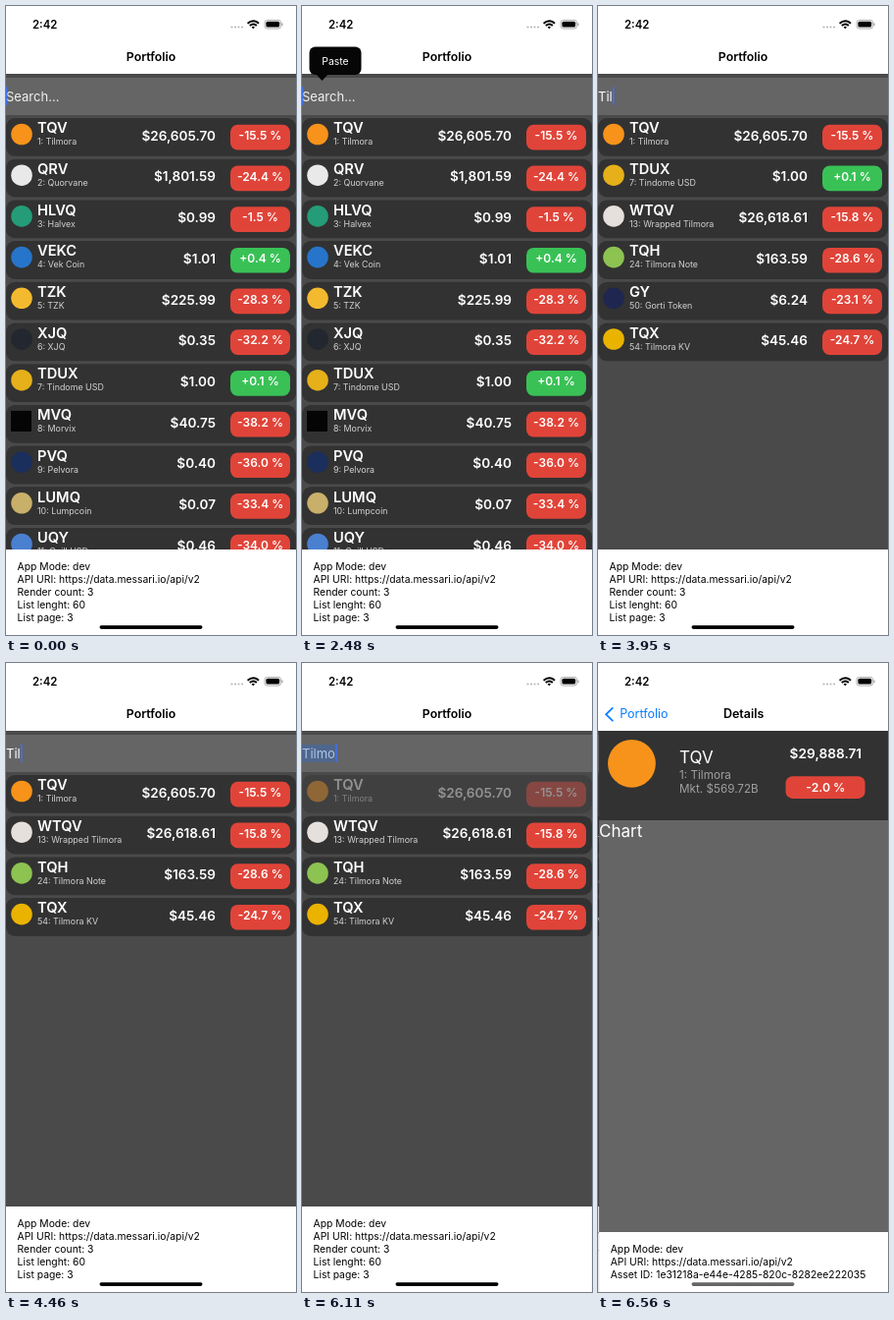
An HTML page that plays this animation: 296x640 px, repeating every 8 s.

```html
<!DOCTYPE html>
<html lang="en">
<head>
<meta charset="utf-8">
<title>Portfolio</title>
<style>
  html, body { margin: 0; width: 100%; height: 100%; overflow: hidden; background: #fff; }
  svg { display: block; width: 100%; height: 100%; font-family: Inter, Roboto, sans-serif; }
  text { white-space: pre; }
  .bold { font-weight: 600; }
  .mid { text-anchor: middle; }
  .end { text-anchor: end; }
</style>
</head>
<body>
<svg id="stage" viewBox="0 0 296 640"></svg>
<script>
const LOOP = 8000;
const RED = '#e04439', GREEN = '#39c156', BLUE = '#0a7cff';

// rank, ticker, name, price, change, icon colour
const coins = [
  [1, 'TQV', 'Tilmora', '26,605.70', -15.5, '#f7931a'],
  [2, 'QRV', 'Quorvane', '1,801.59', -24.4, '#e9e9e9'],
  [3, 'HLVQ', 'Halvex', '0.99', -1.5, '#259c78'],
  [4, 'VEKC', 'Vek Coin', '1.01', 0.4, '#2775ca'],
  [5, 'TZK', 'TZK', '225.99', -28.3, '#f3ba2f'],
  [6, 'XJQ', 'XJQ', '0.35', -32.2, '#23272f'],
  [7, 'TDUX', 'Tindome USD', '1.00', 0.1, '#e5b01a'],
  [8, 'MVQ', 'Morvix', '40.75', -38.2, '#050505'],
  [9, 'PVQ', 'Pelvora', '0.40', -36.0, '#1b2f5c'],
  [10, 'LUMQ', 'Lumpcoin', '0.07', -33.4, '#c8b06a'],
  [11, 'UQY', 'Quill USD', '0.46', -34.0, '#4a80d0'],
  [13, 'WTQV', 'Wrapped Tilmora', '26,618.61', -15.8, '#e6e0dc'],
  [17, 'TVQ', 'Tavrel', '5.12', -30.6, '#5b78c7'],
  [24, 'TQH', 'Tilmora Note', '163.59', -28.6, '#8dc351'],
  [31, 'OSQ', 'Ostrave', '1.27', -27.9, '#3f9fa8'],
  [43, 'NVQ', 'Netvorn', '0.83', -35.1, '#a24d8d'],
  [50, 'GY', 'Gorti Token', '6.24', -23.1, '#1f2750'],
  [54, 'TQX', 'Tilmora KV', '45.46', -24.7, '#eab300'],
];

const text = (x, y, size, fill, value, cls = '', id = '') =>
  `<text id="${id}" class="${cls}" x="${x}" y="${y}" font-size="${size}" fill="${fill}">${value}</text>`;
const rect = (x, y, w, h, fill, r = 0, extra = '') =>
  `<rect x="${x}" y="${y}" width="${w}" height="${h}" rx="${r}" fill="${fill}" ${extra}/>`;

function row([rank, ticker, name, price, change, color], i) {
  const sign = change > 0 ? '+' : '';
  const icon = ticker === 'MVQ'
    ? rect(5, 6, 21, 21, color)
    : `<circle cx="16" cy="16.5" r="10.8" fill="${color}"/>`;
  return `<g class="row" transform="translate(0 ${114 + i * 41.7})">
    ${rect(0, 0, 296, 38.8, '#323232', 9)}${icon}
    ${text(32, 15.3, 14.7, '#fff', ticker, 'bold')}
    ${text(32, 27.3, 8.9, '#d2d2d2', `${rank}: ${name}`)}
    ${text(214, 22.8, 13.55, '#fff', '$' + price, 'bold end')}
    ${rect(229, 6.8, 61, 25.7, change > 0 ? GREEN : RED, 7.5)}
    ${text(259.5, 21.9, 12, '#fff', `${sign}${change.toFixed(1)} %`, 'bold mid')}
  </g>`;
}

function list(query) {
  const hits = coins.filter(c => `${c[1]} ${c[2]}`.toLowerCase().includes(query));
  return `<g class="list">${hits.slice(0, 11).map(row).join('')}</g>`;
}

const panel = (top, lines) => rect(0, top, 296, 640 - top, '#fff') +
  lines.map((line, i) => text(11.6, top + 21.3 + i * 12.8, 10.35, '#000', line)).join('');

const common = ['App Mode: dev', 'API URI: https://data.messari.io/api/v2'];

const portfolioPage = `<g id="portfolio">
  ${rect(0, 69, 296, 490, '#4a4a4a')}${rect(0, 73, 296, 38, '#656565')}
  ${text(0, 96.5, 13, '#f0f0f0', 'Search...', '', 'hint')}
  ${text(0, 96.5, 13, '#fff', '', '', 'typed')}
  ${rect(0, 83, 32, 18, '#2d6ac8', 0, 'id="mark" opacity=".4"')}
  ${rect(0, 82, 1.6, 19, '#3e70f0', 0.8, 'id="caret"')}
  ${['', 't', 'ti', 'til'].map(list).join('')}
  ${panel(553, [...common, 'Render count: 3', 'List lenght: 60', 'List page: 3'])}
  ${rect(0, 69, 296, 571, '#000', 0, 'id="scrim"')}
</g>`;

const detailsPage = `<g id="details">
  ${rect(0, 69, 296, 571, '#656565')}${rect(0, 69, 296, 91, '#323232')}
  <circle cx="33.4" cy="102.3" r="24.4" fill="#f7931a"/>
  ${text(82, 101.5, 17, '#fff', 'TQV')}
  ${text(82, 117.5, 11.7, '#a0a0a0', '1: Tilmora')}
  ${text(82, 132.3, 11.7, '#a0a0a0', 'Mkt. $569.72B')}
  ${text(231.3, 97.2, 13.7, '#fff', '$29,888.71', 'bold mid')}
  ${rect(190.5, 115.3, 81, 22.6, RED, 7)}
  ${text(231.3, 130.9, 12.3, '#fff', '-2.0 %', 'bold mid')}
  ${text(0, 177.2, 17, '#fff', 'Chart')}
  ${panel(579, [...common, 'Asset ID: 1e31218a-e44e-4285-820c-8282ee222035'])}
</g>`;

const dots = [230.5, 234, 237.5, 241].map(x => `<circle cx="${x}" cy="21.5" r="1.1" fill="#b8b8b8"/>`).join('');
const statusBar = text(27, 23, 11.4, '#000', '2:42', 'bold') + dots + `
  <g fill="none" stroke="#000" stroke-width="2">
    <path d="M246.6 17.7Q252.3 12.7 258 17.7M248.8 20Q252.3 17 255.8 20"/>
    <path d="M250.6 21.4Q252.3 20.1 254 21.4L252.3 23.3Z" fill="#000" stroke="none"/>
  </g>
  ${rect(264, 14.4, 16.6, 8.6, 'none', 2.6, 'stroke="#999" stroke-width=".8"')}
  ${rect(265.4, 15.8, 13.8, 5.8, '#000', 1.5)}${rect(281.4, 17.2, 1.1, 3, '#999', 0.5)}`;

const navBar = `${rect(0, 0, 296, 69, '#fff')}${statusBar}
  ${text(148, 56.4, 12.3, '#000', 'Portfolio', 'bold mid', 'title')}
  <path id="chevron" d="M14.8 45.9L8.2 52.3L14.8 58.7" fill="none" stroke="${BLUE}" stroke-width="1.8" stroke-linecap="round"/>
  ${text(46.5, 56.4, 12.5, BLUE, 'Portfolio', 'mid', 'back')}
  ${text(148, 56.4, 12.5, '#000', 'Details', 'bold mid', 'heading')}`;

const pasteMenu = `<g id="paste">
  ${rect(7.5, 41.5, 53, 28.5, '#060606', 6)}
  <path d="M14 69L20.5 76L27 69Z" fill="#060606"/>
  ${text(34, 59.6, 10.4, '#fff', 'Paste', 'mid')}
</g>`;

const stage = document.getElementById('stage');
stage.innerHTML = portfolioPage + detailsPage + navBar + pasteMenu +
  rect(95.5, 630.3, 105, 3.6, '#000', 1.8, 'id="home"');

const $ = id => document.getElementById(id);
const lists = [...stage.querySelectorAll('.list')];
const tapped = lists[3].querySelector('.row');

// Stepped tracks: each pair is a start time and the value held from there.
const track = {
  caret: [[0, 1], [460, .75], [580, 0], [820, .5], [940, 1], [1480, .75], [1600, 0], [1840, .5],
    [1960, 1], [2630, .75], [2750, 0], [2990, .5], [3100, 1], [5260, .3], [5385, .15], [5510, 0],
    [5650, .5], [5770, 1]],
  paste: [[0, 0], [2370, .5], [2480, 1], [3650, .4], [3760, 0]],
  typed: [[0, ''], [3650, 'T'], [3760, 'Ti'], [3950, 'Til'], [4730, 'Tilm'], [4950, 'Tilmo']],
  list: [[0, 0], [3760, 1], [3950, 2], [4460, 3]],
  mark: [[0, 0], [4950, .4]],
  press: [[0, 1], [5960, .4]],
  tick: [[0, 0], [6110, 6110], [6230, 6230], [6330, 6330], [6440, 6440], [6560, 6560]],
};
const at = (name, t) => track[name].findLast(([start]) => start <= t)[1];

// Critically damped spring used for the page push.
function pushProgress(t) {
  const k = Math.max(0, t - 6109) * 0.0173;
  return 1 - (1 + k) * Math.exp(-k);
}

const move = (id, x) => $(id).setAttribute('transform', `translate(${x} 0)`);
const fade = (id, opacity) => $(id).setAttribute('opacity', opacity);

function draw(t) {
  const typed = at('typed', t);
  $('typed').textContent = typed;
  fade('hint', typed ? 0 : 1);
  const width = typed ? $('typed').getComputedTextLength() : 0;
  $('caret').setAttribute('x', typed ? width + .3 : -.2);
  $('mark').setAttribute('width', width);
  fade('caret', at('caret', t));
  fade('mark', at('mark', t));
  fade('paste', at('paste', t));
  lists.forEach((g, i) => g.setAttribute('display', i === at('list', t) ? 'inline' : 'none'));
  tapped.setAttribute('opacity', at('press', t));

  const p = pushProgress(at('tick', t));
  move('portfolio', -88.8 * p);
  move('details', 296 * (1 - p));
  fade('scrim', .1 * p);
  move('title', -94 * p);
  fade('title', 1 - p ** 1.5);
  move('back', 114 * (1 - p));
  fade('back', p ** 1.2);
  fade('chevron', p);
  move('heading', 184 * (1 - p));
  fade('heading', p ** 1.2);
  $('home').setAttribute('fill', p > .1 ? '#666' : '#000');
}

const begin = performance.now();
function frame() {
  draw((performance.now() - begin) % LOOP);
  requestAnimationFrame(frame);
}
frame();
</script>
</body>
</html>
```
